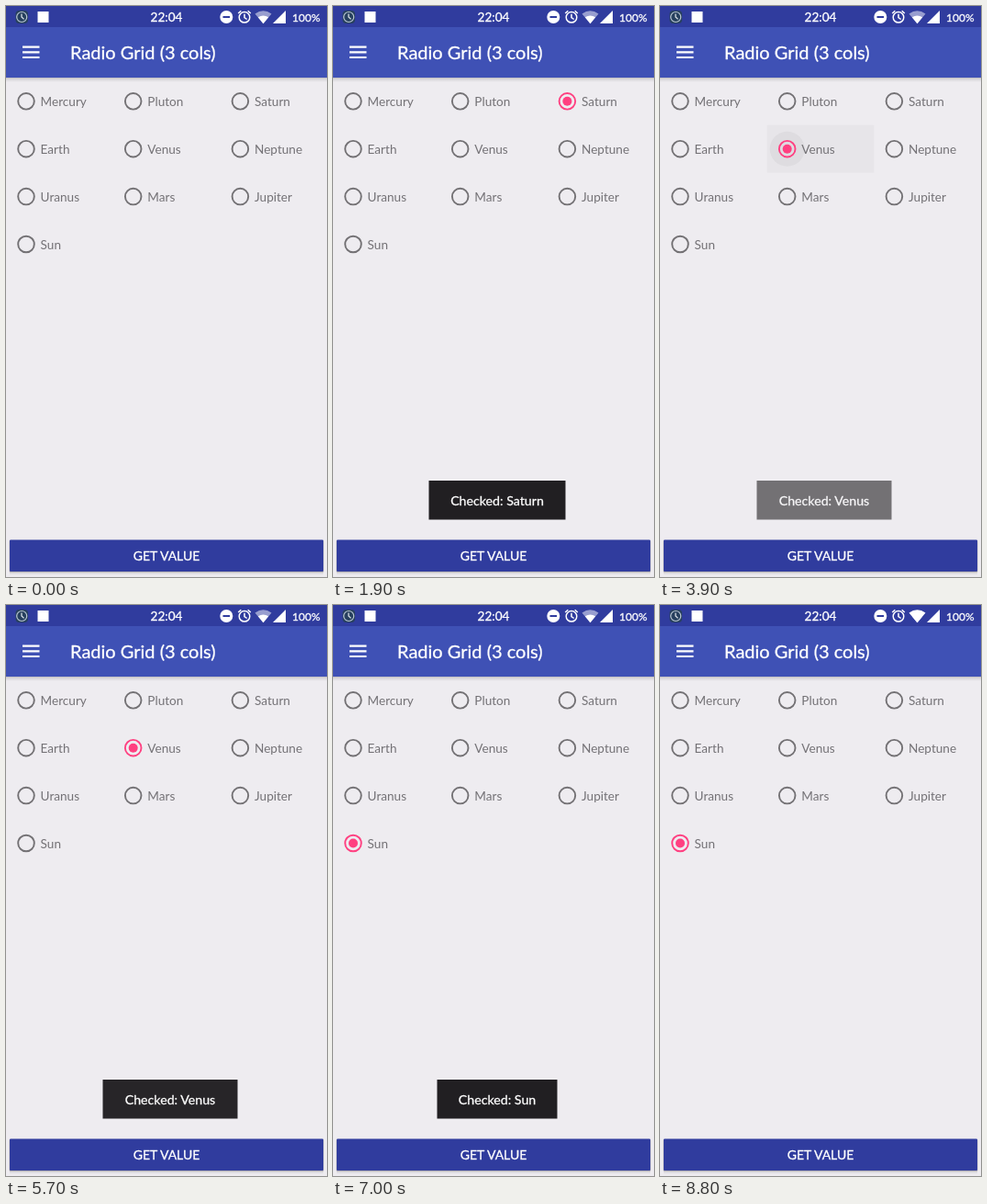
An HTML page for the animation above (9.2 s loop, 350 by 622 pixels).

```html
<!DOCTYPE html>
<html lang="en">
<head>
<meta charset="utf-8">
<title>Radio Grid</title>
<style>
html, body { margin: 0; width: 100%; height: 100%; overflow: hidden; background: #eeecf0; }
svg { display: block; width: 350px; height: 622px; font-family: Lato, sans-serif; }
.medium { stroke: #fff; stroke-width: .3; }
</style>
</head>
<body>
<svg id="stage" viewBox="0 0 350 622">
  <defs>
    <linearGradient id="shade" x2="0" y2="1">
      <stop stop-color="#000" stop-opacity=".3"/>
      <stop offset=".4" stop-color="#000" stop-opacity=".1"/>
      <stop offset="1" stop-color="#000" stop-opacity="0"/>
    </linearGradient>
  </defs>
  <rect width="350" height="622" fill="#eeecf0"/>
  <rect y="77" width="350" height="6" fill="url(#shade)"/>
  <rect width="350" height="78" fill="#3f51b5"/>
  <rect width="350" height="23" fill="#303c9e"/>

  <g fill="#fff">
    <rect x="10.5" y="5" width="13.5" height="14" rx="4" fill="#27405e"/>
    <circle cx="17.2" cy="12" r="5.5" fill="none" stroke="#b9c6d2" stroke-width="1.2"/>
    <path d="M17 8.5V12l2.6 2.4" fill="none" stroke="#e4eaf0" stroke-width="1.2"/>
    <rect x="34.5" y="6" width="12" height="12"/>
    <text x="175" y="17" font-size="13.6" text-anchor="middle" class="medium">22:04</text>
    <circle cx="240.3" cy="12" r="7"/>
    <rect x="236.5" y="11" width="7.6" height="2" fill="#303c9e"/>
    <g fill="none" stroke="#fff" stroke-width="1.5">
      <circle cx="260" cy="12.3" r="5.8"/>
      <path d="M260 8.7v4l2.7 1.8M253.2 8l3.1-2.7M266.8 8l-3.1-2.7"/>
    </g>
    <path id="wifi" d="M271.5 8.5Q280.5 2 289.5 8.5L280.5 19.3Z"/>
    <path d="M274.8 12.3Q280.5 8.5 286.2 12.3L280.5 19.3Z"/>
    <path d="M291 19L305 5V19Z"/>
    <text x="312" y="16.5" font-size="12" class="medium">100%</text>
    <path d="M18 43.5h18.5v2.2H18zM18 49.2h18.5v2.2H18zM18 54.9h18.5v2.2H18z"/>
    <text x="70" y="58" font-size="20" class="medium">Radio Grid (3 cols)</text>
  </g>

  <rect id="cell" height="52" fill="#000"/>
  <circle id="ripple" fill="#000"/>
  <g id="grid"></g>

  <rect x="3" y="582" width="344" height="35" rx="2" fill="#000" opacity=".12"/>
  <rect x="4" y="615" width="342" height="5" fill="url(#shade)"/>
  <rect x="4" y="581.5" width="342" height="34.5" rx="1" fill="#303c9e"/>
  <text x="175" y="604" font-size="14" fill="#fff" text-anchor="middle" class="medium">GET VALUE</text>

  <g id="toast">
    <rect id="box" y="517" height="42.5" fill="#211f22"/>
    <text id="note" x="179" y="544.3" font-size="14.2" fill="#fff" text-anchor="middle" class="medium"></text>
  </g>
</svg>
<script>
const LOOP = 9200, STEP = 100, COL = 116.7, ROW = 51.9;
const names = ["Mercury", "Pluton", "Saturn", "Earth", "Venus", "Neptune", "Uranus", "Mars", "Jupiter", "Sun"];
// item, press time, start and length of the toast's fade-out, toast left edge and width
const taps = [
  { item: 2, at: 950, out: 3000, len: 550, x: 104.5, w: 149 },
  { item: 4, at: 3650, out: 5660, len: 520, x: 105.5, w: 147 },
  { item: 9, at: 6100, out: 8400, len: 400, x: 113.5, w: 131 }
];
const grey = [115, 113, 116], pink = [255, 64, 129];
const $ = id => document.getElementById(id);
const clamp = v => Math.max(0, Math.min(1, v));
const ramp = (t, start, len) => clamp((t - start) / len);
const easeOut = k => 1 - (1 - k) ** 2;
const set = (el, attrs) => { for (const k in attrs) el.setAttribute(k, attrs[k]); };
const centre = i => ({ x: 22 + (i % 3) * COL, y: 103.8 + Math.floor(i / 3) * ROW });

function add(tag, attrs, text) {
  const el = document.createElementNS("http://www.w3.org/2000/svg", tag);
  set(el, attrs);
  if (text) el.textContent = text;
  $("grid").append(el);
  return el;
}

const radios = names.map((name, i) => {
  const { x, y } = centre(i);
  add("text", { x: x + 15.6, y: y + 5.2, "font-size": 13.6, fill: "#747276" }, name);
  return {
    ring: add("circle", { cx: x, cy: y, r: 8.8, fill: "none", "stroke-width": 1.9 }),
    dot: add("circle", { cx: x, cy: y, fill: "#ff4081" })
  };
});

function draw(t) {
  let cur = -1;
  taps.forEach((tap, i) => { if (t > tap.at) cur = i; });
  const tap = taps[cur], prev = taps[cur - 1];
  const swap = tap ? easeOut(ramp(t, tap.at + 50, 200)) : 0;

  radios.forEach(({ ring, dot }, i) => {
    const on = tap && tap.item === i ? swap : prev && prev.item === i ? 1 - swap : 0;
    const rgb = grey.map((g, c) => Math.round(g + (pink[c] - g) * on));
    set(ring, { stroke: `rgb(${rgb})` });
    set(dot, { r: 5 * on });
  });

  set($("wifi"), { opacity: t >= 8500 ? 1 : .5 });

  if (!tap) {
    for (const id of ["cell", "ripple", "toast"]) set($(id), { opacity: 0 });
    return;
  }
  const { x, y } = centre(tap.item);
  const glow = ramp(t, tap.at, 80) * (1 - ramp(t, tap.at + 200, 400));
  const left = Math.max(3, x - 22);
  set($("cell"), { x: left, y: y - 26, width: x - 22 + COL - left, opacity: .038 * glow });
  set($("ripple"), { cx: x, cy: y, r: 8 + 11 * easeOut(ramp(t, tap.at, 220)), opacity: .045 * glow });

  const shown = easeOut(ramp(t, tap.at + 50, 550)) * (1 - ramp(t, tap.out, tap.len) ** 1.35);
  set($("toast"), { opacity: shown });
  set($("box"), { x: tap.x, width: tap.w });
  $("note").textContent = "Checked: " + names[tap.item];
}

const begin = performance.now();
function tick() {
  const t = (performance.now() - begin) % LOOP;
  draw(Math.floor(t / STEP) * STEP);
  requestAnimationFrame(tick);
}
draw(0);
requestAnimationFrame(tick);
</script>
</body>
</html>
```
